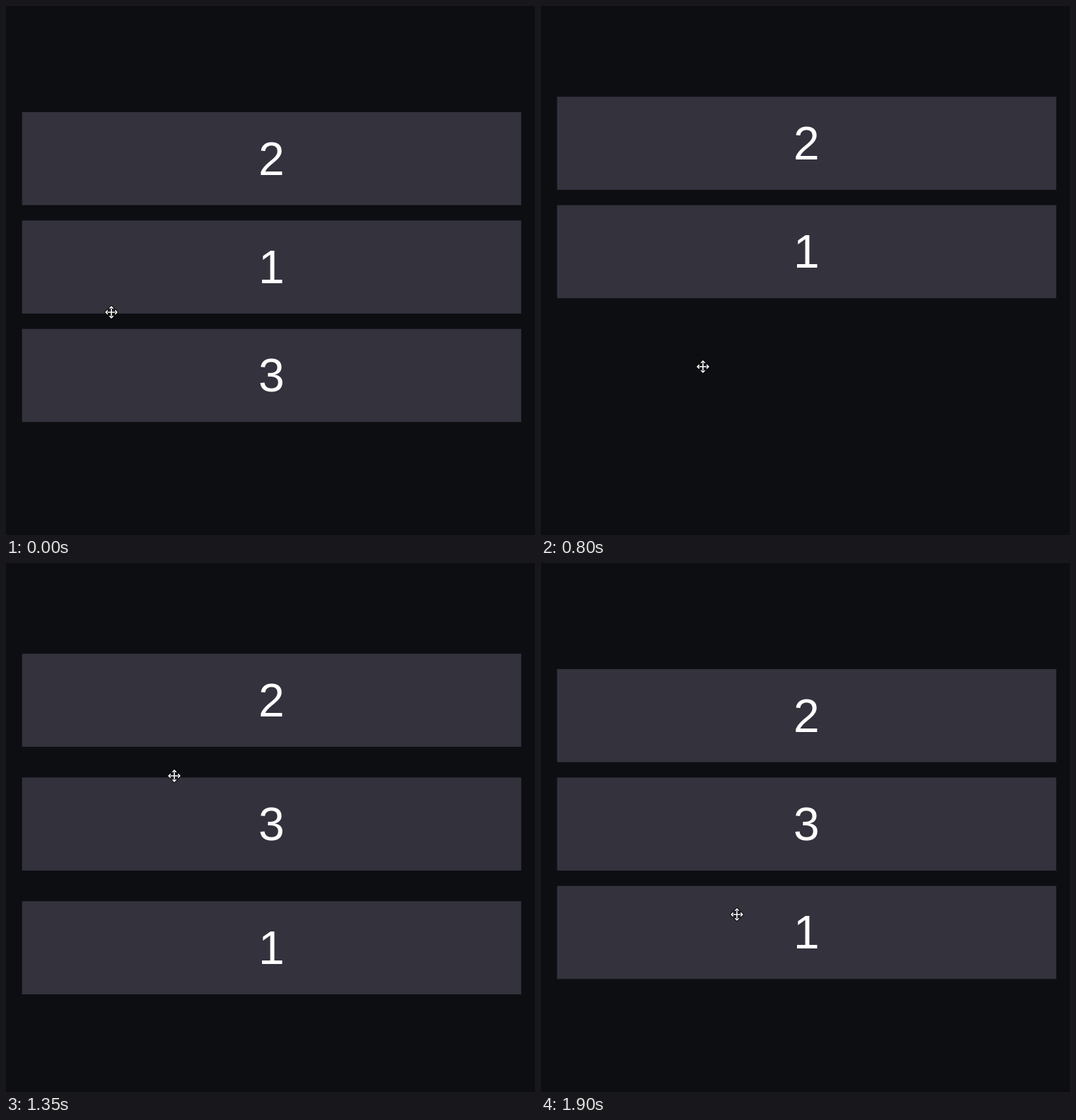
An HTML page with a canvas for the animation above (2.1 s loop, 748x748 px).

```html
<!DOCTYPE html>
<html lang="en">
<head>
<meta charset="utf-8">
<title>Sortable list</title>
<style>
  html, body { margin: 0; width: 100%; height: 100%; overflow: hidden; background: #0d0e12; }
  canvas { display: block; }
</style>
</head>
<body>
<canvas id="stage" width="748" height="748"></canvas>
<script>
const ctx = document.getElementById('stage').getContext('2d');
const LOOP = 2100, STEP = 50;
const BG = '#0d0e12', CARD = '#33323d';
const LEFT = 22.7, WIDTH = 705.8, HEIGHT = 131.6;
const TOP = 150, PITCH = 153.3, GAP = 21.7;

const clamp = v => Math.min(1, Math.max(0, v));
const mix = (a, b, k) => a + (b - a) * k;
const progress = (t, start, length) => clamp((t - start) / length);

// Cubic bezier easing, solved by bisection
function bezier(x1, y1, x2, y2) {
  const axis = (a, b, u) => 3 * a * u * (1 - u) ** 2 + 3 * b * u * u * (1 - u) + u ** 3;
  return x => {
    let lo = 0, hi = 1;
    for (let i = 0; i < 24; i++) {
      const mid = (lo + hi) / 2;
      if (axis(x1, x2, mid) < x) lo = mid; else hi = mid;
    }
    return axis(y1, y2, (lo + hi) / 2);
  };
}
const ease = bezier(0.25, 0.1, 0.25, 1);
const easeOut = bezier(0.2, 0.4, 0.5, 1);
const easeInOut = bezier(0.42, 0, 0.58, 1);
const tween = (t, start, length = 200) => ease(progress(t, start, length));

function card(label, y, alpha = 1) {
  if (alpha <= 0) return;
  ctx.globalAlpha = alpha;
  ctx.fillStyle = CARD;
  ctx.fillRect(LEFT, y, WIDTH, HEIGHT);
  ctx.fillStyle = '#fff';
  ctx.fillText(label, 375.4, y + 88.6);
  ctx.globalAlpha = 1;
}

function pointerPos(t) {
  if (t < 550) {
    const k = easeOut(progress(t, 0, 450));
    return [mix(149, 229, k), mix(433, 519, k)];
  }
  if (t < 1250) return [229, mix(519, 510, progress(t, 550, 50))];
  const k = easeInOut(progress(t, 1400, 500));
  return [mix(238, 277, k), mix(301, 497, k)];
}

function moveShape() {
  const shape = new Path2D();
  shape.rect(-6, -0.8, 12, 1.6);
  shape.rect(-0.8, -6, 1.6, 12);
  for (let i = 0; i < 4; i++) {
    const c = [1, 0, -1, 0][i], s = [0, 1, 0, -1][i];
    const at = (x, y) => [x * c - y * s, x * s + y * c];
    shape.moveTo(...at(9, 0));
    shape.lineTo(...at(5.2, -3.7));
    shape.lineTo(...at(5.2, 3.7));
    shape.closePath();
  }
  return shape;
}
const arrows = moveShape();

function pointer(x, y) {
  ctx.save();
  ctx.translate(x, y);
  ctx.lineWidth = 2;
  ctx.lineJoin = 'round';
  ctx.strokeStyle = '#08080b';
  ctx.stroke(arrows);
  ctx.fillStyle = '#fff';
  ctx.fill(arrows);
  ctx.restore();
}

function draw(t) {
  ctx.fillStyle = BG;
  ctx.fillRect(0, 0, 748, 748);
  ctx.font = '66px "Liberation Sans", Arial, sans-serif';
  ctx.textAlign = 'center';

  const lift = tween(t, 584);
  const shift = tween(t, 950);
  const drop = tween(t, 1128);
  const settle = tween(t, 1440);
  const middle = TOP + PITCH, bottom = TOP + 2 * PITCH;

  const y2 = TOP - GAP * (lift - settle);
  const y1 = middle - GAP * (lift - shift) + (PITCH + GAP) * drop - GAP * settle;
  const dropped = t >= 1150;
  const alpha = dropped ? tween(t, 1180) : 1 - lift;

  card('3', dropped ? middle : bottom, alpha);
  card('2', y2);
  card('1', y1);
  pointer(...pointerPos(t));
}

const begin = performance.now();
function tick() {
  const t = (performance.now() - begin) % LOOP;
  draw(Math.floor(t / STEP) * STEP);
  requestAnimationFrame(tick);
}
tick();
</script>
</body>
</html>
```
